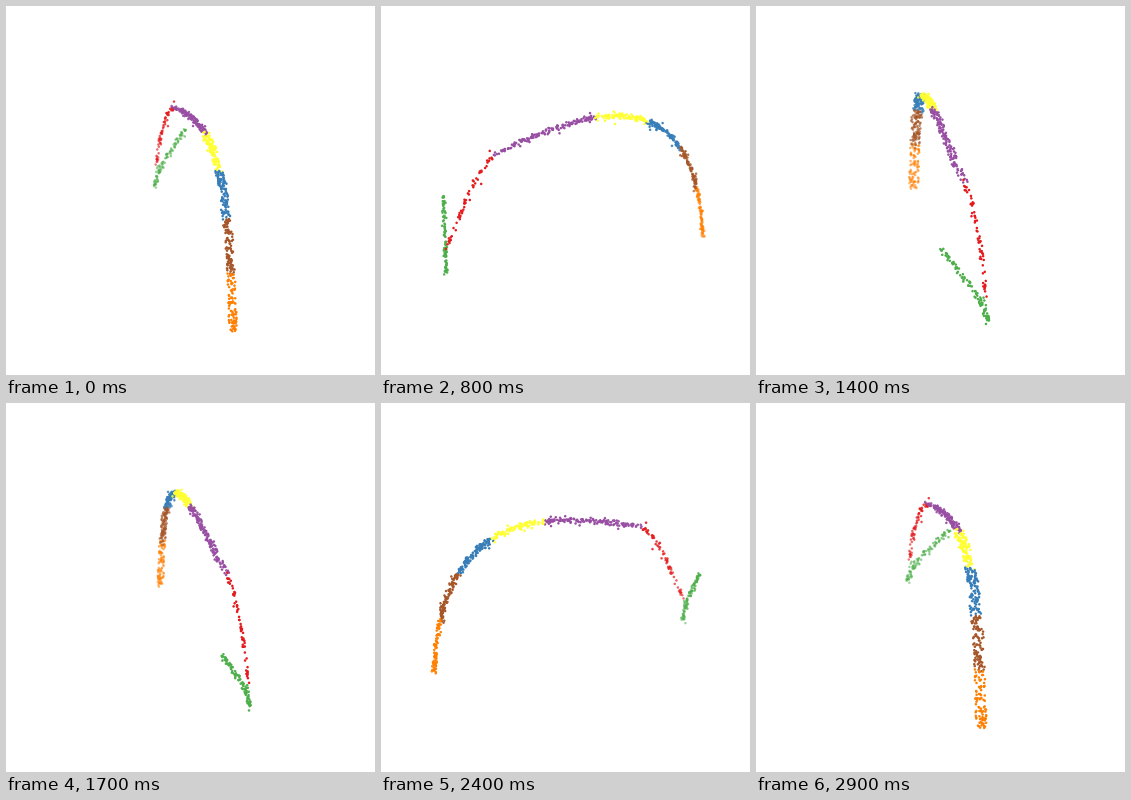
A matplotlib script for the animation above (3000 ms loop, 369 px wide and 369 px high).

```python
import math

import numpy as np
import matplotlib.pyplot as plt
from matplotlib.animation import FuncAnimation
from matplotlib.colors import to_rgb

SIZE, DPI, FRAMES = 369, 100, 30
SCALE = 199.4                # pixels per world unit
CENTER = (189.5, 179.5)
HALF = 0.513                 # half width of the data in the box
CAMERA = 10.0                # camera distance
C30, S30 = math.cos(math.pi / 6), 0.5

rng = np.random.default_rng(11)

# Bezier control points: (along, across, pixels below the center)
BODY = [(1.72, 0.01, 71), (1.55, 0.01, -95), (0.22, 0.12, -72), (-1.03, 0.03, -41)]
LEG = [(-1.03, 0.03, -41), (-1.29, -0.04, -21), (-1.63, -0.035, 40)]
FOOT = [(-1.62, 0.31, 2), (-1.63, 0.16, 22), (-1.64, -0.05, 50), (-1.65, -0.05, 66)]

# color, curve, start and end on the curve, point count, spread across
GROUPS = [
    ("#ff7f00", BODY, 0.00, 0.12, 90, 0.042),
    ("#a65628", BODY, 0.12, 0.26, 100, 0.042),
    ("#377eb8", BODY, 0.26, 0.435, 110, 0.042),
    ("#ffff33", BODY, 0.435, 0.64, 105, 0.040),
    ("#984ea3", BODY, 0.64, 1.00, 150, 0.030),
    ("#e41a1c", LEG, 0.00, 1.00, 62, 0.018),
    ("#4daf4a", FOOT, 0.00, 1.00, 95, 0.022),
]


def bezier(points, t):
    n = len(points) - 1
    return sum(
        math.comb(n, i) * np.outer((1 - t) ** (n - i) * t**i, p)
        for i, p in enumerate(points)
    )


def sample(curve, start, end, count, spread):
    """Scatter points around a stretch of a curve, with a few strays in height."""
    pts = bezier(curve, rng.uniform(start, end, count))
    pts[:, 0] += rng.normal(0, 0.011, count)
    pts[:, 1] += spread * rng.uniform(-1, 1, count)
    pts[:, 2] += np.clip(rng.standard_t(3, count), -11, 11)
    return pts


along, across, drop = np.vstack([sample(*g[1:]) for g in GROUPS]).T
colors = np.array([to_rgb(g[0]) for g in GROUPS for _ in range(g[4])])
z = -drop / (SCALE * C30)


def fit(values):
    """Rescale to fill the box, as autoscaled axes do."""
    low, high = values.min(), values.max()
    return HALF * (2 * values - low - high) / (high - low)


def project(frame):
    """Return screen positions and nearness to the camera."""
    angle = math.radians(360 / FRAMES * frame - 54)
    c, s = math.cos(angle), math.sin(angle)
    x = fit(c * along - s * across)
    y = fit(s * along + c * across)
    right = C30 * x + S30 * y
    back = C30 * y - S30 * x
    near = S30 * z - C30 * back
    up = C30 * z + S30 * back
    zoom = SCALE * CAMERA / (CAMERA - near)
    return CENTER[0] + zoom * right, CENTER[1] - zoom * up, near


fig = plt.figure(figsize=(SIZE / DPI, SIZE / DPI), dpi=DPI, facecolor="white")
ax = fig.add_axes([0, 0, 1, 1])
ax.set_xlim(0, SIZE)
ax.set_ylim(SIZE, 0)
ax.axis("off")
dots = ax.scatter(along, across, s=3.3, c=colors, linewidths=0)


def update(frame):
    px, py, near = project(frame)
    order = np.argsort(near)
    far = (near.max() - near) / np.ptp(near)
    alpha = 1 - (0.7 * far) ** 2
    dots.set_offsets(np.column_stack([px, py])[order])
    dots.set_facecolor(np.column_stack([colors, alpha])[order])
    return (dots,)


anim = FuncAnimation(fig, update, frames=FRAMES, interval=100, repeat=True)
plt.show()
```
